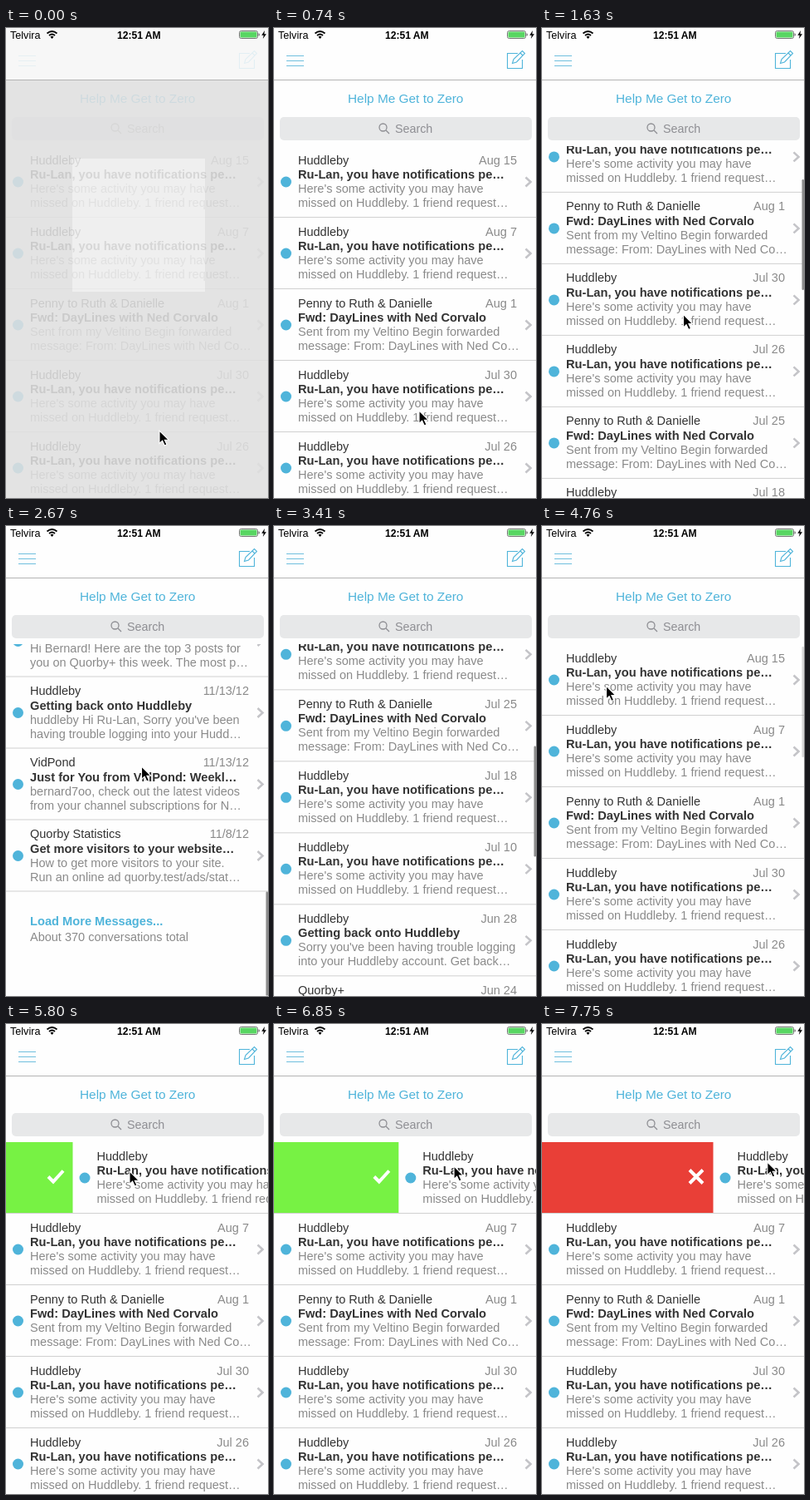
Animation of 316 by 565 pixels, one loop 8000 ms. Source, as an HTML page:

```html
<!DOCTYPE html>
<html lang="en">
<head>
<meta charset="utf-8">
<title>Inbox swipe demo</title>
<style>
  html, body { margin: 0; width: 100%; height: 100%; overflow: hidden; background: #fefefe; }
  svg { display: block; width: 100vw; height: 100vh; font: 14.5px "Liberation Sans", Arial, sans-serif; }
  .line { fill: none; stroke-width: 1; }
  .dark { fill: #333; }
  .grey { fill: #8a8a8a; }
  .blue { fill: #4fb4da; }
  .bold { font-weight: bold; font-size: 14.65px; }
  .end { text-anchor: end; }
</style>
</head>
<body>
<svg viewBox="0 0 316 565">
  <clipPath id="listArea"><rect y="142" width="316" height="423"/></clipPath>
  <rect width="316" height="565" fill="#fefefe"/>

  <g clip-path="url(#listArea)">
    <g id="list"></g>
    <rect id="scrollbar" x="313.5" width="2.5" rx="1.2" fill="#8c8c8c"/>
  </g>

  <g id="header">
    <path class="line" stroke="#b4b4b4" d="M0 62.5H316"/>
    <path class="line" stroke="#6fbfde" d="M15 33.5H36M15 39.5H36M15 45.5H36"/>
    <path class="line" stroke="#4fb4da" style="stroke-width:1.1"
      d="M294 30.5H281.5V48.5H299.5V38M287.5 42.5L289 37.5L299.5 27.5L302.5 30.5L292.5 41ZM297 30L300 33"/>
    <text class="blue" x="89" y="89.5" font-size="15.4">Help Me Get to Zero</text>
    <rect x="7" y="107" width="304" height="28" rx="5" fill="#e7e8e9"/>
    <g class="line" stroke="#8e8e93" style="stroke-width:1.3">
      <circle cx="131.5" cy="119.5" r="4.5"/><path d="M135 123L139 127"/>
    </g>
    <text x="146" y="126" font-size="14.3" fill="#8e8e93">Search</text>
  </g>

  <g id="splash">
    <rect width="316" height="62" fill="#f7f7f7"/>
    <path class="line" stroke="#b4b4b4" d="M0 62.5H316"/>
    <rect y="63" width="316" height="502" fill="#e0e0e0"/>
    <rect x="80" y="157" width="160" height="160" fill="#ededed"/>
  </g>

  <g id="status">
    <text x="5" y="12.5" font-size="12.6">Telvira</text>
    <text x="134" y="12.5" font-size="12.1" font-weight="bold">12:51 AM</text>
    <g class="line" stroke="#000" style="stroke-width:1.8">
      <path d="M49.5 6.5Q55.5 1.5 61.5 6.5M52 9Q55.5 6 59 9"/>
    </g>
    <path d="M53.5 10.6Q55.5 9 57.5 10.6L55.5 13Z"/>
    <rect class="line" x="281.5" y="3.5" width="22" height="9" rx="2" stroke="#777"/>
    <rect x="282.5" y="4.5" width="20" height="7" rx="1" fill="#58d662"/>
    <path d="M304.5 6.2Q306 6.5 306 8T304.5 9.8Z" fill="#777"/>
    <path d="M312 3L308.3 8.8H310.8L309.8 13L314 7.2H311.4Z"/>
  </g>

  <path id="cursor" d="M0 0V15.5L3.6 12.2L6.3 18L9 16.8L6.4 11.2H11.2Z" stroke="#fff" stroke-width="1.1"/>
</svg>

<script>
const LOOP = 8000, STEP = 148.4, LAST_STEP = 52;
const LIST_TOP = 141.5, ROW = 86, MAX_SCROLL = 898.5;

const activity = (date) => ["Huddleby", date, "Ru-Lan, you have notifications pe…",
  "Here's some activity you may have", "missed on Huddleby. 1 friend request…"];
const forwarded = (date) => ["Penny to Ruth & Danielle", date, "Fwd: DayLines with Ned Corvalo",
  "Sent from my Veltino Begin forwarded", "message: From: DayLines with Ned Co…"];
const topPosts = (date) => ["Quorby+", date, "Top 3 posts for you on Quorby+…",
  "Hi Bernard! Here are the top 3 posts for", "you on Quorby+ this week. The most p…"];

const messages = [
  activity("Aug 15"), activity("Aug 7"), forwarded("Aug 1"), activity("Jul 30"),
  activity("Jul 26"), forwarded("Jul 25"), activity("Jul 18"), activity("Jul 10"),
  ["Huddleby", "Jun 28", "Getting back onto Huddleby",
    "Sorry you've been having trouble logging", "into your Huddleby account. Get back…"],
  topPosts("Jun 24"), topPosts("11/14/12"),
  ["Huddleby", "11/13/12", "Getting back onto Huddleby",
    "huddleby Hi Ru-Lan, Sorry you've been", "having trouble logging into your Hudd…"],
  ["VidPond", "11/13/12", "Just for You from VidPond: Weekl…",
    "bernard7oo, check out the latest videos", "from your channel subscriptions for N…"],
  ["Quorby Statistics", "11/8/12", "Get more visitors to your website…",
    "How to get more visitors to your site.", "Run an online ad quorby.test/ads/stat…"],
];

const byId = (id) => document.getElementById(id);
const text = (cls, x, y, content) =>
  `<text class="${cls}" x="${x}" y="${y}">${content.replace("&", "&amp;")}</text>`;

const rowMarkup = ([sender, date, title, line1, line2], i) => `
  <g transform="translate(0 ${i * ROW})">
    ${i ? "" : `<g id="action">
      <rect id="actionFill" y=".5" height="85.5"/>
      <g id="actionIcon" class="line" stroke="#fff" style="stroke-width:4">
        <path id="check" d="M-9 0L-3 6L9 -7"/><path id="cross" d="M-8 -8L8 8M8 -8L-8 8"/>
      </g>
    </g>`}
    <g ${i ? "" : 'id="swiped"'}>
      <circle class="blue" cx="14.5" cy="43.5" r="6.5"/>
      ${text("dark", 29, 22, sender)}${text("grey end", 293, 22, date)}
      ${text("dark bold", 29, 39.5, title)}
      ${text("grey", 29, 56.5, line1)}${text("grey", 29, 73.5, line2)}
      <path class="line" stroke="#c4c4c8" style="stroke-width:2.6" d="M303.5 38L309.5 43.5L303.5 49"/>
    </g>
    <path class="line" stroke="#d0d0d0" d="M0 86H316"/>
  </g>`;

byId("list").innerHTML = messages.map(rowMarkup).join("") +
  `<g transform="translate(0 ${messages.length * ROW})">
    ${text("blue bold", 29, 40.5, "Load More Messages...")}
    ${text("grey", 29, 60, "About 370 conversations total")}
  </g>`;

const linear = (p) => p;
const easeIn = (p) => p ** 1.5;
const easeOut = (p) => 1 - (1 - p) ** 2;
const clamp = (v, lo, hi) => Math.min(hi, Math.max(lo, v));

// Keys are [time, value, easing into this key].
function valueAt(keys, t) {
  const next = keys.findIndex(([time]) => time > t);
  if (next === 0) return keys[0][1];
  if (next < 0) return keys[keys.length - 1][1];
  const [t0, v0] = keys[next - 1];
  const [t1, v1, ease = linear] = keys[next];
  return v0 + (v1 - v0) * ease((t - t0) / (t1 - t0));
}

const scrollKeys = [[1050, 0], [1632, 115.5, easeIn], [2671, 906.5, easeOut], [2830, 898.5],
  [3413, 375, easeIn], [3860, -18, easeOut], [4007, -6], [4460, 0, easeOut]];
const swipeKeys = [[5060, 0], [5340, 45], [5500, 45], [5787, 80.4], [6380, 130, easeOut],
  [6540, 130], [7570, 203], [7716, 206.5]];
const cursorX = [[0, 185], [740, 175], [1050, 175], [1632, 170.5], [2230, 163.5],
  [4007, 163.5], [4460, 130], [4900, 70.5, easeOut]];
const cursorY = [[0, 484], [740, 460], [1050, 460], [1632, 344.5, easeIn], [1930, 289],
  [2830, 289], [3400, 575], [3860, 565], [4007, 545], [4460, 255], [4900, 184, easeOut]];

function drawScroll(t) {
  const scroll = valueAt(scrollKeys, t);
  byId("list").setAttribute("transform", `translate(0 ${LIST_TOP - scroll})`);

  const inside = clamp(scroll, 0, MAX_SCROLL);
  const overscroll = Math.abs(scroll - inside);
  const bar = byId("scrollbar");
  bar.setAttribute("y", 145 + inside * 0.319 + (scroll > inside ? overscroll : 0));
  bar.setAttribute("height", 133 - overscroll);
  bar.setAttribute("opacity", t < 1050 ? 0 : clamp((4850 - t) / 300, 0, 1));
}

function drawSwipe(offset) {
  const color = offset < 52 ? "#dedede" : offset < 170 ? "#77f244" : "#e93f37";
  byId("swiped").setAttribute("transform", `translate(${offset} 0)`);
  byId("action").setAttribute("visibility", offset > 0 ? "visible" : "hidden");
  byId("actionFill").setAttribute("width", offset);
  byId("actionFill").setAttribute("fill", color);
  byId("actionIcon").setAttribute("transform", `translate(${offset - 20.5} 42)`);
  byId("check").setAttribute("opacity", offset < 170 ? 1 : 0);
  byId("cross").setAttribute("opacity", offset < 170 ? 0 : 1);
}

function draw(now) {
  const t = STEP * Math.min(LAST_STEP, Math.floor((now % LOOP + 10) / STEP));
  const offset = valueAt(swipeKeys, t);
  drawScroll(t);
  drawSwipe(offset);
  byId("splash").setAttribute("opacity", 0.88 * clamp(1 - t / 740, 0, 1));
  const x = valueAt(cursorX, t) + offset * 0.975;
  const y = valueAt(cursorY, t) - offset * 0.087;
  byId("cursor").setAttribute("transform", `translate(${x} ${y})`);
}

const start = performance.now();
function tick() {
  draw(performance.now() - start);
  requestAnimationFrame(tick);
}
tick();
</script>
</body>
</html>
```
